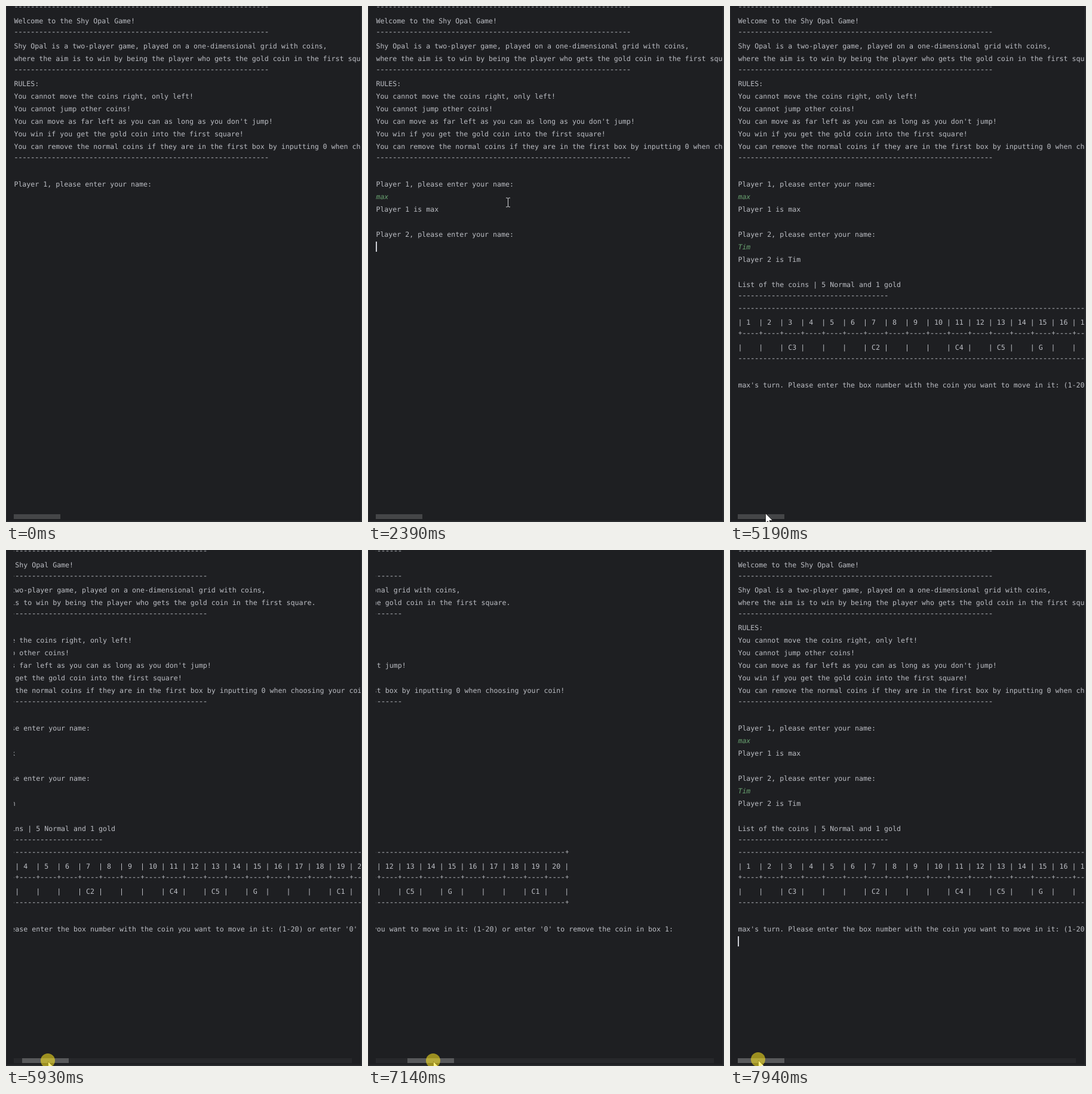
These frames come from a looping animation (596x863 px, 8 s). An HTML page:

```html
<!DOCTYPE html>
<html lang="en">
<head>
<meta charset="utf-8">
<title>Console game</title>
<style>
  html, body { margin: 0; width: 100%; height: 100%; overflow: hidden; background: #1e1f22; }
  #stage { position: relative; width: 596px; height: 863px; overflow: hidden; background: #1e1f22; }
  #stage div, #stage svg { position: absolute; }
  #view { left: 13px; top: 0; width: 581px; height: 850px; overflow: hidden; }
  #text { left: 0; top: 0; width: 900px; height: 850px; }
  .row {
    left: .4px; height: 21px; white-space: pre; color: #bcbec4;
    font: 11.627px/21px "DejaVu Sans Mono", "Liberation Mono", monospace;
    text-rendering: geometricPrecision; font-variant-ligatures: none;
  }
  .rule { margin-top: -3px; font: 11.667px/21px "Noto Sans Mono", monospace; }
  .typed { color: #69a170; font-style: italic; }
  #caret { width: 2px; height: 17px; background: #ced0d6; }
  .edge { background: #2b2d30; }
  #track { left: 13px; top: 850px; width: 566px; height: 8px; background: #27282b; }
  #thumb { left: 13px; top: 850px; width: 78px; height: 8px; background: #454648; }
  #thumb.hover { background: #58595b; }
  #halo { width: 24px; height: 24px; border-radius: 50%; background: rgba(255, 232, 30, .56); }
  svg { left: 0; top: 0; overflow: visible; }
</style>
</head>
<body>
<div id="stage">
  <div class="edge" style="left:0;top:0;width:1px;height:863px"></div>
  <div class="edge" style="left:594px;top:0;width:2px;height:863px"></div>
  <div class="edge" style="left:0;top:861px;width:596px;height:2px"></div>
  <div id="view"><div id="text"><div id="caret"></div></div></div>
  <div id="track"></div>
  <div id="thumb"></div>
  <svg id="beam" width="1" height="1">
    <path d="M-3.5-7.5h2.5l1 1 1-1h2.5M-3.5 7.5h2.5l1-1 1 1h2.5M0-7v14" fill="none" stroke="#d4d5d8"/>
  </svg>
  <svg id="arrow" width="1" height="1">
    <path d="M0 0V16.5L3.8 13 6.3 18.7 8.9 17.6 6.4 12H11.8Z" fill="#fff" stroke="#111" stroke-width=".8"/>
  </svg>
  <div id="halo"></div>
</div>
<script>
const LOOP = 8000, TICK = 200 / 3;
const CHAR = 7, LINE = 21;
const GRAB = 5400, GRAB_X = 55.5, SCROLL_RATIO = 7.2;

const $ = id => document.getElementById(id);
const [text, caret, track, thumb, beam, arrow, halo] =
  ['text', 'caret', 'track', 'thumb', 'beam', 'arrow', 'halo'].map($);

const rule = '-'.repeat(61);
const border = '-'.repeat(100) + '+';
const coins = { 3: 'C3', 7: 'C2', 11: 'C4', 13: 'C5', 15: 'G', 19: 'C1' };
const cells = fn =>
  Array.from({ length: 20 }, (_, i) => '| ' + String(fn(i + 1)).padEnd(3)).join('') + '|';

// The console from top to bottom: printed lines, or a word typed from one time to another
const session = [
  { at: 0, lines: [
    rule, 'Welcome to the Shy Opal Game!', rule,
    'Shy Opal is a two-player game, played on a one-dimensional grid with coins,',
    'where the aim is to win by being the player who gets the gold coin in the first square.',
    rule, 'RULES:',
    'You cannot move the coins right, only left!',
    'You cannot jump other coins!',
    "You can move as far left as you can as long as you don't jump!",
    'You win if you get the gold coin into the first square!',
    'You can remove the normal coins if they are in the first box by inputting 0 when choosing your coin!',
    rule, '', 'Player 1, please enter your name:'] },
  { word: 'max', from: 1660, to: 2260 },
  { at: 2390, lines: ['Player 1 is max', '', 'Player 2, please enter your name:'] },
  { word: 'Tim', from: 2930, to: 3400 },
  { at: 3730, lines: ['Player 2 is Tim', '', 'List of the coins | 5 Normal and 1 gold', '-'.repeat(36)] },
  { at: 3930, lines: [
    border, cells(n => n), '+----'.repeat(20) + '+', cells(n => coins[n] || ''), border, '',
    "max's turn. Please enter the box number with the coin you want to move in it: (1-20) or enter '0' to remove the coin in box 1:"] }
];

// Pointer waypoints: time, x, y
const path = [
  [120, 537, 725], [190, 524, 696], [850, 524, 696], [1194, 300, 153],
  [1400, 234, 328], [4594, 234, 328], [5190, 59, 848], [GRAB, GRAB_X, 855],
  [5605, GRAB_X, 855], [6610, 112.7, 855], [7000, 112.7, 855], [7890, 46.5, 853]
];

const ease = k => k * k * (3 - 2 * k);

function pointerAt(t) {
  const next = path.findIndex(p => p[0] > t);
  if (next < 1) return path.at(next).slice(1);
  const [t0, x0, y0] = path[next - 1], [t1, x1, y1] = path[next];
  const k = ease((t - t0) / (t1 - t0));
  return [x0 + (x1 - x0) * k, y0 + (y1 - y0) * k];
}

const show = (el, on) => { el.style.visibility = on ? 'visible' : 'hidden'; };
const place = (el, x, y) => { el.style.transform = `translate(${x}px, ${y}px)`; };

function addRow(row, line, cls = '') {
  const el = document.createElement('div');
  el.className = 'row ' + (/^[-+]+$/.test(line) ? 'rule' : cls);
  el.style.top = row * LINE - 6 + 'px';
  el.textContent = line;
  text.insertBefore(el, caret);
  return el;
}

const printed = [], typed = [];
let rows = 0;
for (const { at, lines, ...input } of session) {
  if (lines) for (const line of lines) printed.push({ at, row: rows, el: addRow(rows++, line) });
  else typed.push({ ...input, row: rows, el: addRow(rows++, '', 'typed') });
}

function typedPart({ word, from, to }, t) {
  const gap = (to - from) / (word.length - 1);
  return word.slice(0, Math.max(0, Math.floor((t - from) / gap) + 1));
}

function renderConsole(t) {
  let row = 0, col = 0;
  for (const p of printed) {
    const on = t >= p.at;
    show(p.el, on);
    if (on) row = p.row + 1;
  }
  for (const p of typed) {
    const part = typedPart(p, t);
    if (p.el.textContent !== part) p.el.textContent = part;
    if (p.row === row) col = part.length;
  }
  show(caret, (t >= 1400 && t < 4925) || t >= 7870);
  place(caret, col * CHAR, row * LINE - 5);
}

function renderPointer(t) {
  const q = Math.floor((t + 12) / TICK) * TICK;
  const [px, py] = pointerAt(q);
  const x = Math.round(px), y = Math.round(py);
  const scroll = q < GRAB ? 0 : Math.max(0, Math.round((px - GRAB_X) * SCROLL_RATIO));
  const hover = q >= 5330, atBar = q >= 5190;

  place(text, -scroll, 0);
  place(thumb, Math.round(scroll / SCROLL_RATIO), 0);
  thumb.className = hover ? 'hover' : '';
  show(track, hover);
  show(beam, t >= 120 && !atBar);
  show(arrow, atBar);
  show(halo, q >= GRAB);
  place(beam, x + .5, y + .5);
  place(arrow, x + .5, y + .5);
  place(halo, x - 12, y - 13);
}

const start = performance.now();
function frame() {
  const t = (performance.now() - start) % LOOP;
  renderConsole(t);
  renderPointer(t);
  requestAnimationFrame(frame);
}
frame();
</script>
</body>
</html>
```
